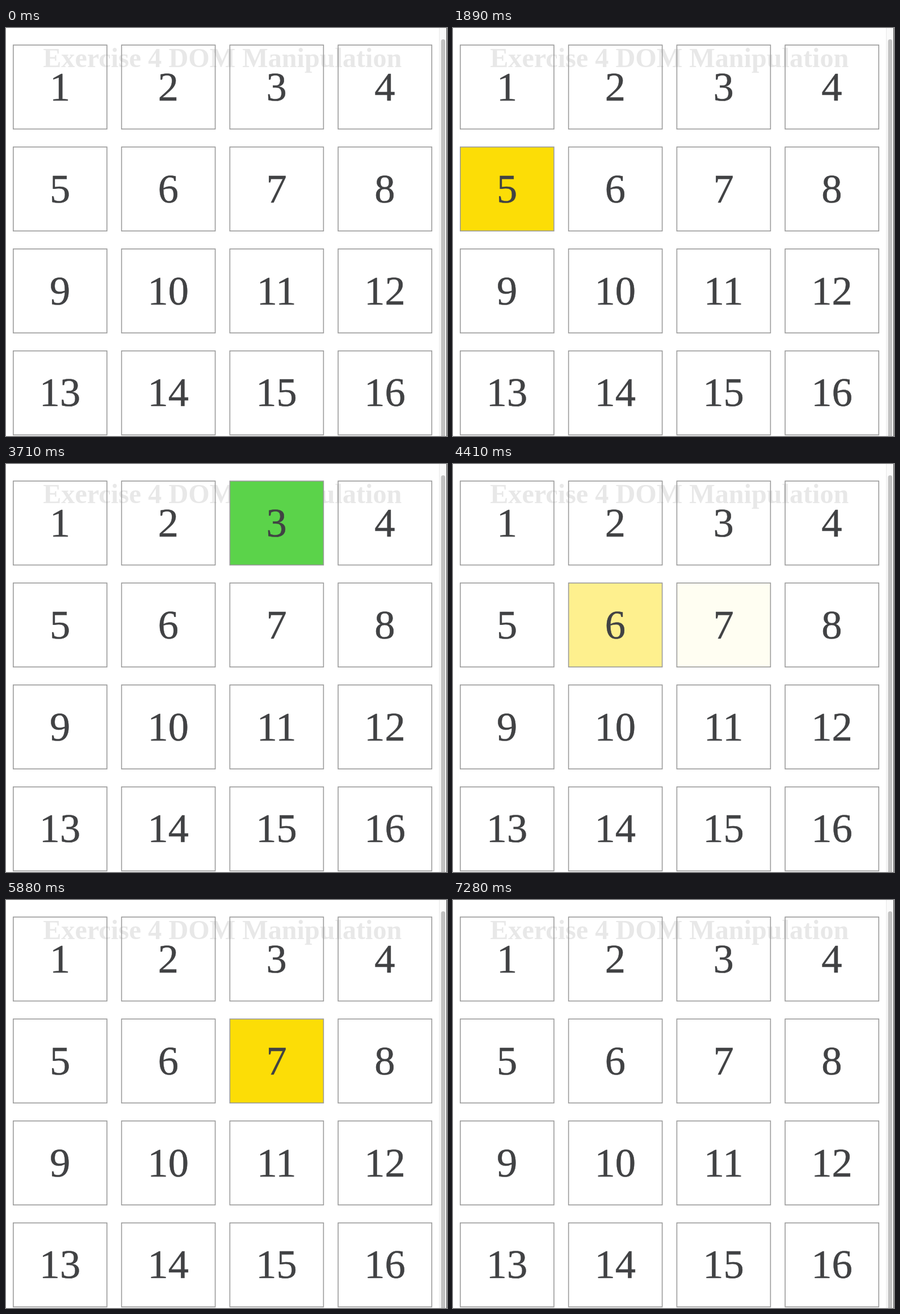
Write an HTML page that moves like this. It is 777 px wide and 720 px high and loops after 7350 ms.

```html
<!DOCTYPE html>
<html lang="en">
<head>
<meta charset="utf-8">
<title>Number grid</title>
<style>
  html, body { margin: 0; width: 100%; height: 100%; overflow: hidden; background: #fff; }
  svg { display: block; }
  text { font-family: "Liberation Serif", Times, serif; text-anchor: middle; }
  #grid text { font-size: 72.5px; fill: #414244; stroke: #414244; stroke-width: .5; }
</style>
</head>
<body>
<svg width="777" height="720" viewBox="0 0 777 720">
  <text x="381.3" y="69" font-size="48.2" font-weight="bold" fill="#e8e8e8">Exercise 4 DOM Manipulation</text>
  <g id="grid"></g>
  <rect x="763" width="14" height="720" fill="#fafafa"/>
  <rect x="763" width="1" height="720" fill="#e8e8e8"/>
  <rect x="766.5" y="20" width="7.5" height="740" rx="3.7" fill="#c2c2c2"/>
  <rect x="776" width="1" height="720" fill="#444"/>
</svg>
<script>
const LOOP = 7350, STEP = 70, FADE = 140, SAMPLES = 20;
const YELLOW = '#fcdd06', GREEN = '#5bd34a';
const CIRCLE_START = 2660, CIRCLE_END = 6200;

// Key points of the unseen pointer: time, column, row (whole numbers are cell centres)
const route = [
  [600, 1, 3.5], [810, 1, 2.4], [1750, .1, 1.2], [2030, .43, 1], [2360, 1.65, .05],
  [CIRCLE_START, 2, .5], [CIRCLE_END, 1.35, 1],
  [6350, 1.35, 1.6], [6550, 1.8, 2], [7150, 2, 3.5]
];

const grid = document.getElementById('grid');

function add(tag, attrs, label = '') {
  const el = document.createElementNS('http://www.w3.org/2000/svg', tag);
  for (const key in attrs) el.setAttribute(key, attrs[key]);
  el.textContent = label;
  return grid.appendChild(el);
}

const cells = Array.from({ length: 16 }, (_, i) => {
  const x = 12.8 + (i % 4) * 190.8;
  const y = 30.1 + Math.floor(i / 4) * 179.9;
  const box = { x, y, width: 165, height: 148.2 };
  const fill = add('rect', box);
  add('rect', { ...box, fill: 'none', stroke: '#9b9b9b', 'stroke-width': 1.6 });
  add('text', { x: x + 82.2, y: y + 97.6 }, i + 1);
  return fill;
});

function pointer(t) {
  if (t > CIRCLE_START && t < CIRCLE_END) {
    // clockwise laps around the corner shared by 2, 3, 6 and 7, slowing down
    const angle = 2 * Math.PI * ((t - CIRCLE_START) / 1250) ** .8;
    return [1.5 + Math.cos(angle) / 2, .5 + Math.sin(angle) / 2];
  }
  const next = route.findIndex(key => key[0] > t);
  if (next < 1) return route.at(next)?.slice(1);
  const [t0, x0, y0] = route[next - 1], [t1, x1, y1] = route[next];
  const k = (t - t0) / (t1 - t0);
  return [x0 + (x1 - x0) * k, y0 + (y1 - y0) * k];
}

function cellAt(t) {
  const [x, y] = pointer(t);
  const col = Math.round(x), row = Math.round(y);
  const inside = Math.abs(x - col) < .43 && Math.abs(y - row) < .415;
  return inside ? cells[row * 4 + col] : undefined;
}

const pressed = t => (t > 800 && t < 1330) || (t > 3500 && t < 3950);

// A cell's strength is the share of the last FADE ms that the pointer was over it
function draw(now) {
  const t = Math.floor((now % LOOP) / STEP) * STEP;
  const levels = new Map();
  for (let i = SAMPLES - 1; i >= 0; i--) {
    const time = t - (i + .5) * FADE / SAMPLES;
    const cell = cellAt(time);
    if (!cell) continue;
    levels.set(cell, (levels.get(cell) || 0) + 1 / SAMPLES);
    cell.setAttribute('fill', pressed(time) ? GREEN : YELLOW);
  }
  for (const cell of cells) cell.setAttribute('fill-opacity', levels.get(cell) || 0);
}

const start = performance.now();
function tick() {
  draw(performance.now() - start);
  requestAnimationFrame(tick);
}
tick();
</script>
</body>
</html>
```
